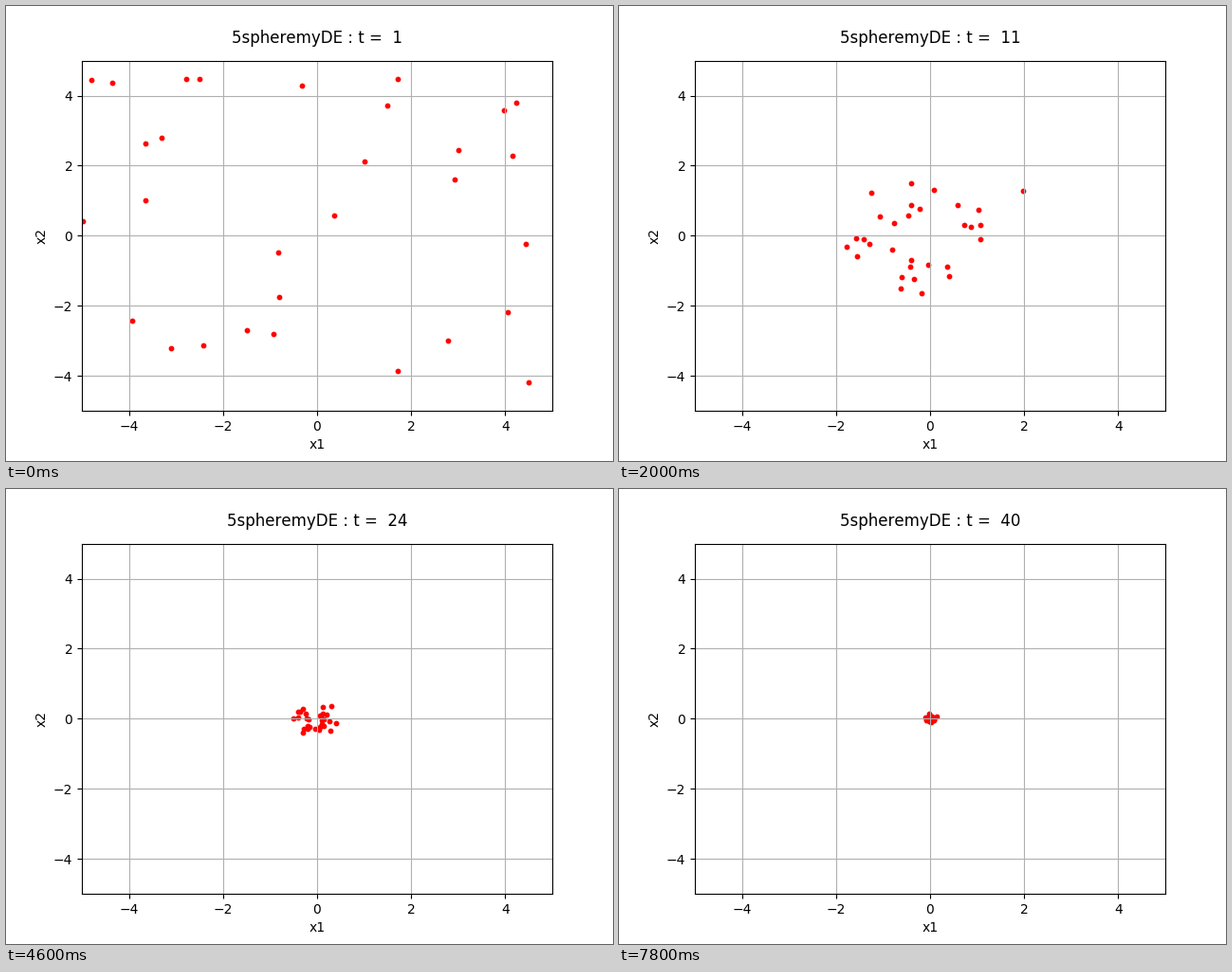
Write a matplotlib script that moves like this. It is 640 px wide and 480 px high and loops after 8000 ms.

```python
import numpy as np
import matplotlib.pyplot as plt
from matplotlib.animation import FuncAnimation

GENS = 40
SIZE = 30
LIMIT = 5
rng = np.random.default_rng(12)
plt.rcParams["text.kerning_factor"] = 6


def radius(gen):
    """The swarm shrinks by the same share in every generation."""
    return 5.4 * np.exp(-gen / 10)


def evolve():
    """Points rest until they leap to a better place nearer the optimum.

    Those outside the swarm's radius leap often, those inside now and then.
    """
    now = rng.uniform(-LIMIT, LIMIT, (SIZE, 2))
    pops = [now]
    for gen in range(2, GENS + 1):
        r = radius(gen)
        outside = np.hypot(*now.T) > r
        chance = np.where(outside, .65, .15)
        leap = rng.random(SIZE) < chance
        fresh = rng.normal(0, .5 * r, (SIZE, 2))
        now = np.where(leap[:, None], fresh, now)
        pops.append(now)
    return pops


pops = evolve()

fig, ax = plt.subplots(figsize=(6.4, 4.8), dpi=100)
ax.set(xlim=(-LIMIT, LIMIT), ylim=(-LIMIT, LIMIT), xlabel="x1", ylabel="x2")
ax.grid(True)
dots = ax.scatter(*pops[0].T, s=10, c="red")
title = ax.text(.5, 1.05, "", size=12, ha="center", transform=ax.transAxes)


def draw(i):
    dots.set_offsets(pops[i])
    title.set_text(f"5spheremyDE : t =  {i + 1}")
    return dots, title


anim = FuncAnimation(fig, draw, frames=GENS, interval=200, repeat=True)
plt.show()
```
